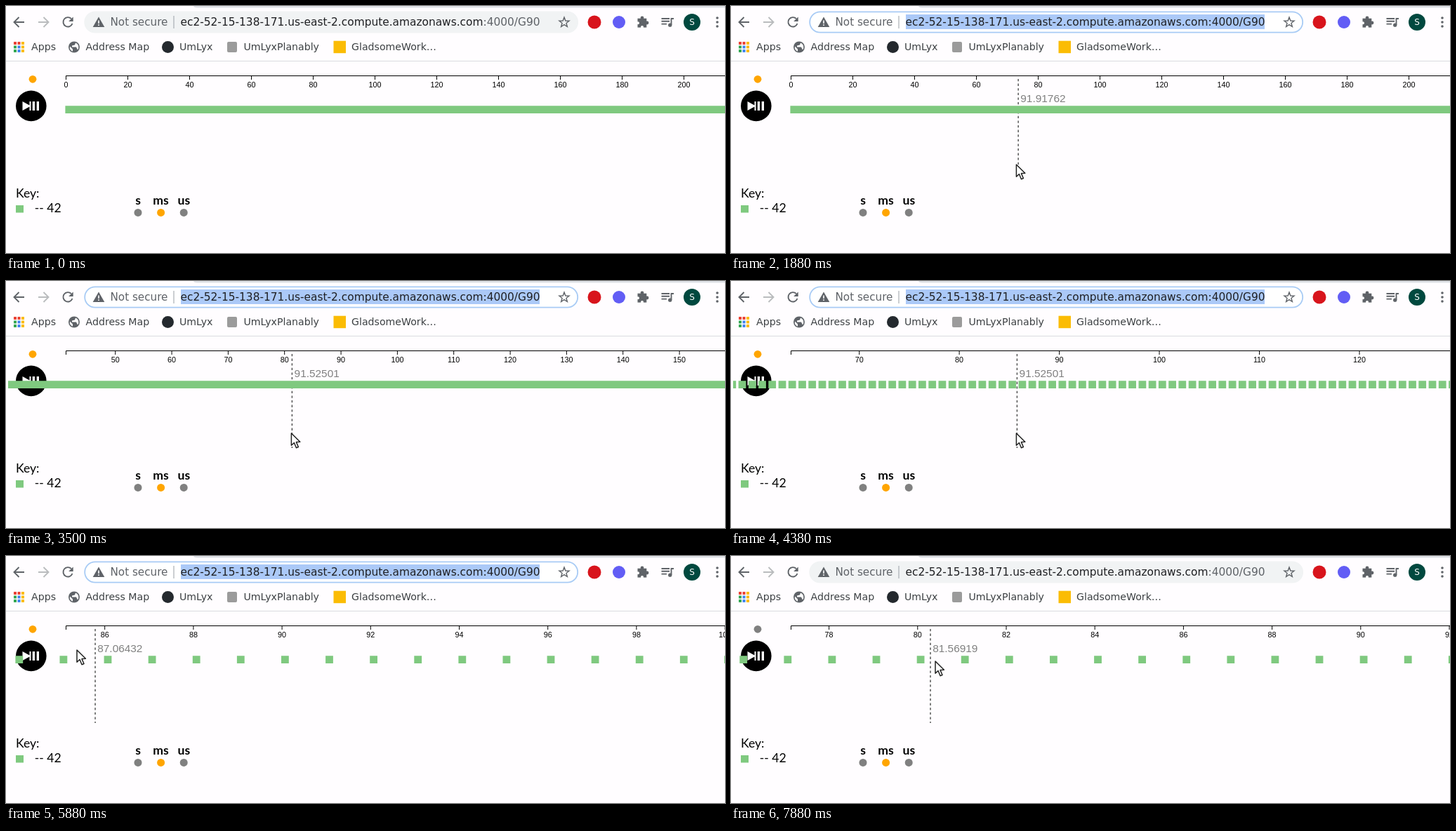
Write an HTML page that moves like this. It is 1024 px wide and 352 px high and loops after 8 s.

```html
<!DOCTYPE html>
<html lang="en">
<head>
<meta charset="utf-8">
<title>Timeline zoom</title>
<style>
html, body { margin: 0; width: 100%; height: 100%; overflow: hidden; background: #fffdff; }
svg { display: block; }
.ui { font-family: "DejaVu Sans", sans-serif; fill: #3c4043; }
.mark { font-size: 14.15px; }
.url { font-size: 15.4px; }
.key { font: 17.6px Lato, sans-serif; }
.unit { font-weight: bold; text-anchor: middle; }
.axis { font: 10.8px "Liberation Sans", Arial, sans-serif; text-anchor: middle; }
.value { font: 15.4px "Liberation Sans", Arial, sans-serif; fill: #808080; }
.icon { fill: #5f6368; }
.line { fill: none; stroke: #5f6368; stroke-width: 1.9; }
</style>
</head>
<body>
<svg width="1024" height="352" viewBox="0 0 1024 352">
  <defs>
    <clipPath id="plot"><rect x="3" y="80" width="1021" height="180"/></clipPath>
    <path id="arrow" d="M7.5 0H-6M0 -7L-7 0 0 7"/>
  </defs>

  <g class="ui">
    <path d="M267 0H1024V2.5H272Q268 2.5 267 0Z" fill="#dee1e6"/>
    <rect y="78" width="1024" height="1" fill="#dadce0"/>
    <rect id="pill" x="112.2" y="8.3" width="702" height="29.4" rx="14.7" stroke-width="1.8"/>
    <rect id="selection" x="249" y="12" width="511" height="21" fill="#abc9f8"/>
    <text x="148.5" y="28.3" font-size="15.2" style="fill:#5f6368">Not secure</text>
    <rect x="238.5" y="14" width="1" height="18" fill="#9aa0a6"/>
    <text class="url" x="248.5" y="28.3" style="fill:#202124">ec2-52-15-138-171.us-east-2.compute.amazonaws.com<tspan id="path">:4000/G90</tspan></text>

    <g class="line">
      <use href="#arrow" x="18.5" y="23"/>
      <use href="#arrow" transform="translate(53.5 23) scale(-1 1)" stroke="#babcbe"/>
      <path d="M94.5 25A6.7 6.7 0 1 1 93 18.2"/>
      <path id="star" stroke-width="1.4"/>
      <path d="M933.5 18H945M933.5 21.8H945M933.5 25.6H941M947.5 27V18H951"/>
    </g>
    <g class="icon">
      <path d="M95.7 15.5V22H89.2Z"/>
      <path d="M132 15.5L140.3 30H123.7Z"/>
      <path d="M132 20.5V25M132 26.2V28" stroke="#fff" stroke-width="1.6"/>
      <circle cx="945.7" cy="27.2" r="2.6"/>
      <path d="M899.5 17.7H912.3V30.6H899.5Z"/>
      <circle cx="906" cy="17" r="2.4"/><circle cx="913" cy="24" r="2.4"/>
      <g fill="#fff"><circle cx="900" cy="24.3" r="2"/><circle cx="906" cy="30" r="2"/></g>
      <circle cx="97" cy="58.5" r="8"/>
      <path d="M91 57.5L95 61.5V64.7A6.4 6.4 0 0 1 91 57.5ZM99 52.5L98 55.5 94 56.5V58.5H100L102 62.5A6.4 6.4 0 0 0 99 52.5Z" fill="#fff"/>
      <circle cx="1013" cy="17" r="1.8"/><circle cx="1013" cy="23" r="1.8"/><circle cx="1013" cy="29" r="1.8"/>
    </g>
    <circle cx="838" cy="23" r="9.5" fill="#d8141c"/>
    <circle cx="873" cy="23" r="9" fill="#625df5"/>
    <circle cx="977" cy="23" r="12" fill="#00493f"/>
    <text x="977" y="27.4" font-size="12" text-anchor="middle" style="fill:#fff">S</text>

    <g id="apps"></g>
    <circle cx="230.5" cy="58.5" r="8.5" fill="#24292e"/>
    <rect x="315" y="51" width="14" height="15" rx="2" fill="#9b9b9b"/>
    <rect x="466.5" y="49.7" width="17.5" height="17.5" fill="#fbbc04"/>
    <g class="mark">
      <text x="36" y="63.2">Apps</text>
      <text x="113.5" y="63.2">Address Map</text>
      <text x="247" y="63.2">UmLyx</text>
      <text x="338.5" y="63.2">UmLyxPlanably</text>
      <text x="492" y="63.2">GladsomeWork…</text>
    </g>
  </g>

  <circle id="live" cx="38" cy="104.3" r="5.4"/>
  <circle cx="35.8" cy="142.4" r="21.8"/>
  <path d="M23.5 136L33.5 141.5V136H35.5V149H33.5V143.5L23.5 149ZM37.7 136H41V149H37.7ZM43.7 136H47V149H43.7Z" fill="#fff"/>

  <g class="key">
    <text x="14" y="272.6">Key:</text>
    <rect x="14" y="284" width="11" height="10.5" fill="#7fc97f"/>
    <text x="40.8" y="294.4">-- 42</text>
    <g class="unit"><text x="188" y="283.4">s</text><text x="220.5" y="283.4">ms</text><text x="253.3" y="283.4">us</text></g>
    <g fill="#808080"><circle cx="188" cy="294.4" r="5.5"/><circle cx="220.6" cy="294.4" r="5.5" fill="#ffa500"/><circle cx="253.2" cy="294.4" r="5.5"/></g>
  </g>

  <path d="M85.5 105V99.5H1030" fill="none" stroke="#000"/>
  <path id="ticks" stroke="#000"/>
  <g id="labels" class="axis"></g>
  <g id="hover">
    <path d="M0 104V238" stroke="#4a4a4a" stroke-width="1.4" stroke-dasharray="3.3"/>
    <text id="value" class="value" x="3.2" y="137"></text>
  </g>
  <path id="bars" fill="#7fc97f" clip-path="url(#plot)"/>
  <path id="cursor" d="M0 0V17.2L4 13.5 7 20.8 10 19.5 7 12.6 12.4 12.3Z" fill="#fff" stroke="#222" stroke-width="1.5" stroke-linejoin="round"/>
</svg>

<script>
const LOOP = 8000, TICK = 125, LAG = 41;
const LEFT = 85.5, BASE = 4.4, ANCHOR = 91.52501;
const FOCUS = 375, ZOOM = 2625, DRAG = 5875, DROP = 6250, CLICK = 7000;
const $ = id => document.getElementById(id);

// Key points: time, then values, joined by straight lines
const zoomKeys = [[ZOOM, 0], [3000, .285], [3125, .285], [3625, 1.063], [3750, 1.063], [4375, 1.695], [4875, 3.842]];
const pointerKeys = [
  [FOCUS, 474, 30], [875, 463, 245], [1080, 463, 245], [1125, 438, 245], [1875, 406.4, 226], [2125, 406.4, 217],
  [5375, 406.4, 217], [DRAG, 101, 134], [DROP, 604.7, 138], [6750, 38, 104],
  [7250, 38, 104], [7780, 272.5, 144], [7875, 291, 150]
];

function track(keys, t) {
  const next = keys.findIndex(key => key[0] > t);
  if (next < 1) return keys.at(next).slice(1);
  const a = keys[next - 1], b = keys[next], f = (t - a[0]) / (b[0] - a[0]);
  return a.slice(1).map((v, i) => v + (b[i + 1] - v) * f);
}
const pointer = t => track(pointerKeys, t);

// Zoom keeps the anchor in place; dragging adds the pointer's travel
function scale(t) {
  const k = BASE * 2 ** track(zoomKeys, t)[0];
  const pan = t < DRAG ? 0 : pointer(Math.min(t, DROP))[0] - pointer(DRAG)[0];
  const origin = LEFT + BASE * ANCHOR + (k > BASE ? 1.1 : 0) + pan;
  return { k, x: v => origin + k * (v - ANCHOR), invert: x => ANCHOR + (x - origin) / k };
}

// Round steps of 1, 2 or 5, about ten across the axis
function tickStep(k) {
  const raw = 105 / k, power = 10 ** Math.floor(Math.log10(raw)), e = raw / power;
  return power * (e >= 7.07 ? 10 : e >= 3.16 ? 5 : e >= 1.41 ? 2 : 1);
}

function drawChart({ k, x, invert }) {
  const step = tickStep(k), end = invert(1045);
  let ticks = '', labels = '', bars = '';
  for (let i = Math.ceil(invert(LEFT - .1) / step); i * step < end; i++) {
    const p = x(i * step).toFixed(1);
    ticks += `M${p} 99.5V105`;
    labels += `<text x="${p}" y="116">${i * step}</text>`;
  }
  for (let v = Math.max(0, Math.floor(invert(-10))); v < end; v++)
    bars += `M${(x(v) - 1.1).toFixed(1)} 142.3h10.8v10.7h-10.8z`;
  $('ticks').setAttribute('d', ticks);
  $('labels').innerHTML = labels;
  $('bars').setAttribute('d', bars);
}

// The guide trails the pointer and rests during zoom and drag
function drawPointer(t) {
  const [x, y] = pointer(t);
  const heard = t >= ZOOM && t <= 5375 ? ZOOM : t >= DRAG && t <= DROP ? DRAG : t;
  const line = pointer(heard - LAG)[0] + 1;
  $('cursor').style.display = t < FOCUS ? 'none' : '';
  $('cursor').setAttribute('transform', `translate(${x} ${y})`);
  $('hover').style.display = t < FOCUS || y < 100 ? 'none' : '';
  $('hover').setAttribute('transform', `translate(${line} 0)`);
  $('value').textContent = scale(heard).invert(line + LEFT - 4.68996).toFixed(5);
}

function drawFocus(on) {
  $('pill').setAttribute('fill', on ? '#fff' : '#f1f3f4');
  $('pill').setAttribute('stroke', on ? '#a8cbf5' : '#f1f3f4');
  $('selection').style.display = on ? '' : 'none';
  $('path').style.fill = on ? '#202124' : '#5f6368';
}

const palette = ['#ea4335', '#34a853', '#4285f4', '#fbbc04'];
for (let i = 0; i < 9; i++) {
  const col = i % 3, row = Math.floor(i / 3), color = palette[col === 2 ? 3 : row ? col + 1 : 0];
  $('apps').innerHTML += `<rect x="${11 + col * 5.5}" y="${51 + row * 5.5}" width="4" height="4" fill="${color}"/>`;
}
$('star').setAttribute('d', 'M' + Array.from({ length: 10 }, (_, i) => {
  const r = i % 2 ? 3.1 : 7.4, a = i * Math.PI / 5;
  return [795 + r * Math.sin(a), 23.5 - r * Math.cos(a)];
}).join('L') + 'Z');

let last = -1;
function frame() {
  const t = Math.floor(performance.now() % LOOP / TICK) * TICK;
  if (t !== last) {
    last = t;
    drawChart(scale(t));
    drawPointer(t);
    drawFocus(t >= FOCUS && t < CLICK);
    $('live').setAttribute('fill', t < CLICK ? '#ffa500' : '#808080');
  }
  requestAnimationFrame(frame);
}
frame();
</script>
</body>
</html>
```
